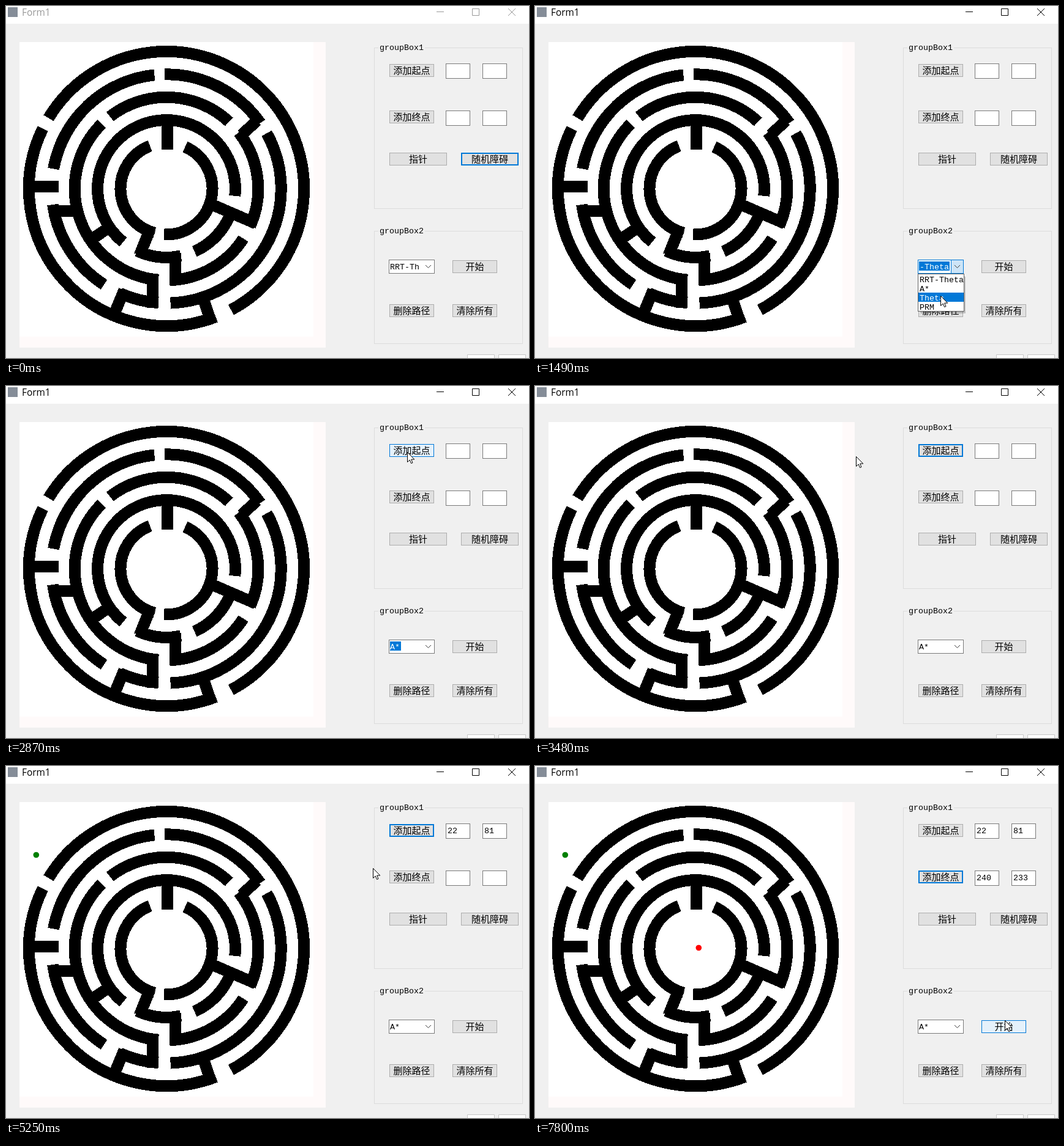
Write an HTML page that moves like this. It is 854 by 576 pixels and loops after 8000 ms.

```html
<!DOCTYPE html>
<html lang="zh">
<head>
<meta charset="utf-8">
<title>Form1</title>
<style>
  html, body { margin: 0; width: 100%; height: 100%; overflow: hidden; background: #f0f0f0; }
  svg { display: block; width: 854px; height: 576px; }
  text { font: 13.33px "Liberation Mono", monospace; white-space: pre; }
  .cjk { font: 15px "Noto Sans CJK SC", "Noto Sans CJK", sans-serif; text-anchor: middle; }
  .title { font: 15.4px "Open Sans", "Noto Sans", sans-serif; fill: currentColor; }
  .line { fill: none; stroke: currentColor; }
  .field { fill: #fff; stroke: #7a7a7a; }
  .white { fill: #fff; }
  .blue { fill: #0078d7; }
  .maze { fill: none; stroke: #000; stroke-width: 19; shape-rendering: crispEdges; }
</style>
</head>
<body>
<svg viewBox="0 0 854 576">
  <rect width="854" height="576" fill="#f0f0f0"/>
  <rect width="854" height="29" fill="#fff"/>
  <rect x="3" y="2" width="16" height="16" fill="#858d98"/>
  <g id="caption">
    <text class="title" x="26" y="16">Form1</text>
    <path class="line" d="M703 9.5h12M761.5 4.5h11v11h-11z"/>
    <path class="line" d="M820 4l12 12M832 4l-12 12"/>
  </g>

  <rect x="22" y="59" width="500" height="500" fill="#fffafa"/>
  <rect x="22" y="59" width="480" height="482" fill="#fff"/>
  <g class="maze">
    <path id="rings"/>
    <path d="M40 295H86M70 335H116M263.5 190V235M239.500 442V494M276 404V457M333 323.500L408 356
      M409.500 187.500L385 211M319 470L335 517M193 465L175.500 507M235 366L218 408M171 360.500L138 383"/>
  </g>
  <circle cx="49.3" cy="145.5" r="4.8" fill="#008000" data-on="4560 8000"/>
  <circle cx="267.3" cy="297.5" r="4.8" fill="#f00" data-on="6570 8000"/>

  <g id="groups"></g>
  <g id="fields"></g>
  <g data-on="4560 8000"><text x="721" y="110">22</text><text x="781" y="110">81</text></g>
  <g data-on="6570 8000"><text x="721" y="187">240</text><text x="781" y="187">233</text></g>
  <g id="buttons"></g>

  <rect class="field" x="625.5" y="415.5" width="74" height="22"/>
  <g stroke="#0078d7" data-on="860 1870">
    <rect x="625.5" y="415.5" width="74" height="22" fill="#fff"/>
    <rect x="679.5" y="415.5" width="20" height="22" fill="#cce4f7"/>
  </g>
  <path d="M685 424l4.5 4.5l4.5-4.5" fill="none" stroke="#404040"/>
  <text x="627" y="431" data-on="0 1020">RRT-Th</text>
  <g data-on="1020 1870">
    <rect class="blue" x="627" y="418" width="50" height="15"/>
    <text class="white" x="628" y="431">-Theta</text>
  </g>
  <g data-on="1870 3100">
    <rect class="blue" x="627" y="418" width="18" height="15"/>
    <text class="white" x="627" y="431">A*</text>
  </g>
  <text x="627" y="431" data-on="3100 8000">A*</text>

  <g data-on="1020 1870">
    <path d="M630 443h73v60h-73zM629 442h73v60h-73z" opacity=".2"/>
    <rect x="625.5" y="438.5" width="75" height="61" fill="#fff" stroke="#646464"/>
    <g id="items"></g>
  </g>

  <path d="M753.5 577v-6.5h44v6.5M804.5 577v-6.5h44v6.5" fill="#fdfdfd" stroke="#c8c8c8"/>

  <path id="arrow" d="M.5.5V16.5L4.2 13L6.6 18.6L9 17.6L6.7 12.1H11.8Z" fill="#fff" stroke="#000"/>
  <path id="cross" d="M-12 0H12M0-12V12" stroke="#000" stroke-width="2"/>
</svg>
<script>
const $ = id => document.getElementById(id);
const LOOP = 8000, STEP = 76.95;

// Maze rings, inner to outer: start and end angle of each wall in turn
const rings = [
  [105, 249, 294, 453],
  [22, 66, 78, 115, 129, 366],
  [-38, 24, 33, 88, 95, 225, 232, 313],
  [-29, 88, 94, 114, 123, 172, 190, 264, 269, 325],
  [69, 206, 211, 422]
];
const polar = (r, deg) => {
  const a = deg * Math.PI / 180;
  return `${262 + r * Math.cos(a)} ${299 + r * Math.sin(a)}`;
};
let walls = '';
rings.forEach((stops, i) => {
  const r = 75 + 37.4 * i;
  for (let n = 0; n < stops.length; n += 2) {
    const [a, b] = stops.slice(n, n + 2);
    walls += `M${polar(r, a)}A${r} ${r} 0 ${+(b - a > 180)} 1 ${polar(r, b)}`;
  }
});
$('rings').setAttribute('d', walls);

// Form controls
$('groups').innerHTML = [[68, 263], [368, 184]].map(([y, h], i) =>
  `<rect x="601.5" y="${y + .5}" width="242" height="${h}" fill="none" stroke="#dcdcdc"/>
   <rect x="608" y="${y - 3}" width="76" height="7" fill="#f0f0f0"/>
   <text x="610" y="${y + 4}">groupBox${i + 1}</text>`).join('');

$('fields').innerHTML = [94, 171].map(y => [718, 778].map(x =>
  `<rect class="field" x="${x + .5}" y="${y + .5}" width="39" height="24"/>`).join('')).join('');

const items = [['RRT-Theta', '1020 1400'], ['A*', '1640 1870'], ['Theta', '1400 1640'], ['PRM', '0 0']];
$('items').innerHTML = items.map(([name, lit], i) => {
  const y = 439 + i * 15;
  return `<text x="628" y="${y + 13}">${name}</text>
    <g data-on="${lit}"><rect class="blue" x="626" y="${y}" width="74" height="15"/>
    <text class="white" x="628" y="${y + 13}">${name}</text></g>`;
}).join('');

const looks = {
  plain: ['#e1e1e1', '#adadad', 1],
  focus: ['#e1e1e1', '#0078d7', 2],
  hover: ['#e5f1fb', '#0078d7', 1]
};
// label, x, y, width, then [time, look] changes
const buttons = [
  ['添加起点', 626, 95, 73, [2710, 'hover'], [3100, 'focus'], [5650, 'plain']],
  ['添加终点', 626, 171, 73, [5330, 'hover'], [5650, 'focus']],
  ['指针', 626, 240, 94],
  ['随机障碍', 743, 240, 94, [0, 'focus'], [1020, 'plain']],
  ['开始', 729, 416, 73, [7650, 'hover']],
  ['删除路径', 626, 488, 73],
  ['清除所有', 729, 488, 73]
].map(([label, x, y, w, ...changes]) => {
  $('buttons').insertAdjacentHTML('beforeend',
    `<rect/><text class="cjk" x="${x + w / 2}" y="${y + 16}">${label}</text>`);
  const box = $('buttons').lastChild.previousSibling;
  return t => {
    const last = changes.filter(c => c[0] <= t).pop();
    const [fill, stroke, sw] = looks[last ? last[1] : 'plain'];
    const attrs = { x: x + sw / 2, y: y + sw / 2, width: w - sw, height: 21 - sw,
      fill, stroke, 'stroke-width': sw };
    for (const k in attrs) box.setAttribute(k, attrs[k]);
  };
});

const timed = [...document.querySelectorAll('[data-on]')].map(el =>
  [el, ...el.dataset.on.split(' ').map(Number)]);

// Pointer moves: start, end, where to, sideways bow on the way
const moves = [
  [150, 930, 690, 424, 0, 0],
  [1020, 1480, 662, 474, 0, 0],
  [1560, 1720, 652, 458, 0, 0],
  [1870, 2860, 655, 108, 54, 0],
  [3100, 4240, 44, 140, 0, 0],
  [4560, 5460, 649, 176, 0, -22],
  [5650, 6400, 262, 292, 0, 0],
  [6570, 7340, 786, 262, 0, 50],
  [7340, 7790, 767, 416, 0, 0]
];
const ease = p => p * p * p * (p * (p * 6 - 15) + 10);

function pointerAt(t) {
  let x = 752, y = 506;
  for (const [start, end, toX, toY, bowX, bowY] of moves) {
    if (t < start) break;
    const p = ease(Math.min(1, (t - start) / (end - start)));
    const bow = Math.sin(Math.PI * p);
    x += (toX - x) * p + bowX * bow;
    y += (toY - y) * p + bowY * bow;
  }
  return [Math.round(x), Math.round(y)];
}

const show = (el, on) => el.setAttribute('visibility', on ? 'inherit' : 'hidden');

function draw(t) {
  $('caption').style.color = t < 860 ? '#999' : '#000';
  timed.forEach(([el, a, b]) => { el.style.display = t >= a && t < b ? '' : 'none'; });
  buttons.forEach(paint => paint(t));

  // The pointer advances 13 times a second
  const [x, y] = pointerAt(175 + STEP * Math.floor((t - 165) / STEP));
  const inside = x >= 22 && x < 522 && y >= 59 && y < 559;
  show($('arrow'), t >= 150 && !inside);
  show($('cross'), t >= 150 && inside);
  for (const id of ['arrow', 'cross']) $(id).setAttribute('transform', `translate(${x} ${y})`);
}

function tick() {
  draw(performance.now() % LOOP);
  requestAnimationFrame(tick);
}
tick();
</script>
</body>
</html>
```
